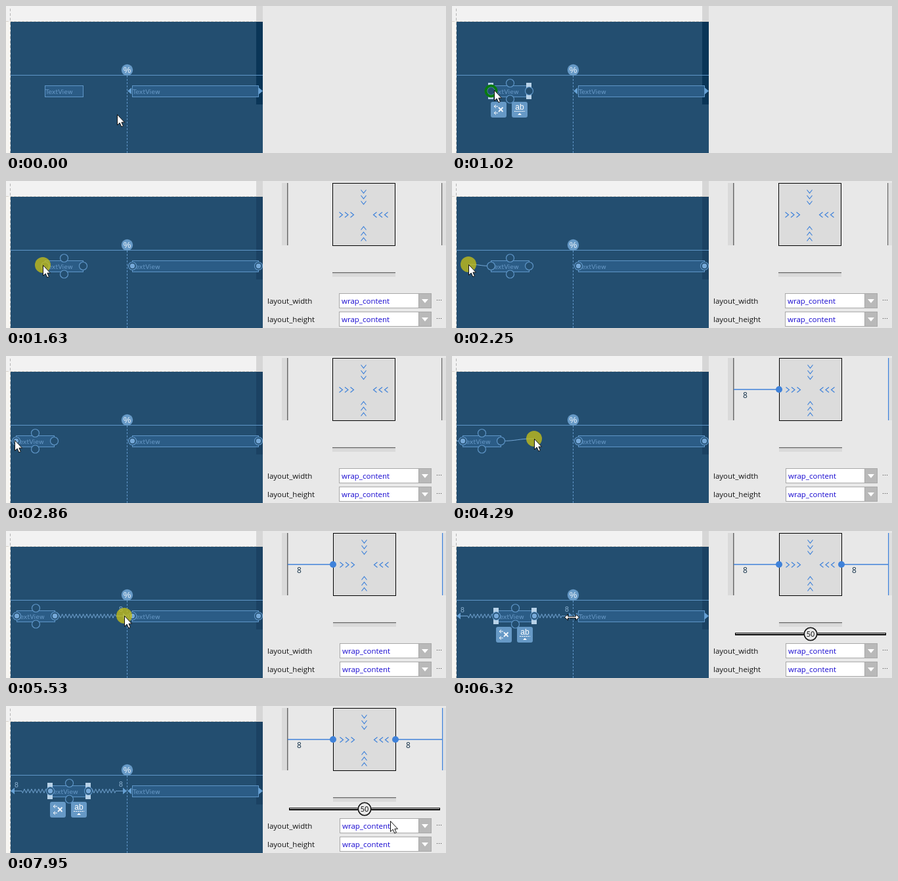
Write an HTML page with a canvas that moves like this. It is 670 px wide and 224 px high and loops after 8 s.

```html
<!DOCTYPE html>
<html lang="en">
<head>
<meta charset="utf-8">
<title>Layout editor</title>
<style>
html, body { margin: 0; width: 100%; height: 100%; overflow: hidden; background: #e8e8e8; }
canvas { display: block; }
</style>
</head>
<body>
<canvas id="stage" width="670" height="224"></canvas>
<script>
const c = document.getElementById('stage').getContext('2d');
const LOOP = 8000, TICK = 77.9;
const BLUE = '#234e70', LINE = '#5f96c8', BADGE = '#6699c6', ACCENT = '#3f82da';
const MID = 129.5, GUIDE = 184;

// Pointer path: [tick, x, y]
const POINTER = [
  [0, 169, 165], [6, 103, 134], [7, 103, 134], [9, 84, 130], [10, 84, 130], [13, 64, 128],
  [19, 64, 128], [29, 25, 127], [30, 13, 128], [36, 13, 128], [40, 36, 133], [42, 66, 133],
  [43, 66, 133], [46, 71, 128], [48, 72, 128], [53, 97, 125], [54, 97, 125], [57, 180, 129],
  [85, 180, 129], [88, 232, 163], [89, 232, 163], [91, 233, 164], [92, 233, 164],
  [97, 420, 204], [102, 585, 175]
];
// Left edge of the small view: [tick, x]
const VIEW = [[0, 59], [31, 59], [36, 15], [47, 15], [48, 16], [71, 16], [76, 67]];

function at(keys, k) {
  const i = keys.findIndex(key => key[0] > k);
  if (i < 0) return keys[keys.length - 1].slice(1);
  const a = keys[i - 1], b = keys[i], p = (k - a[0]) / (b[0] - a[0]);
  return a.slice(1).map((v, n) => Math.round(v + (b[n + 1] - v) * p));
}
const within = (k, a, b) => k >= a && k <= b;

function box(x, y, w, h, color) {
  c.fillStyle = color;
  c.fillRect(x, y, w, h);
}
function frame(x, y, w, h, fill, stroke) {
  box(x, y, w, h, fill);
  c.strokeStyle = stroke;
  c.lineWidth = 1;
  c.strokeRect(x + .5, y + .5, w - 1, h - 1);
}
function path(points, { fill, stroke, width = 1, close = false, dash = [] }) {
  c.beginPath();
  points.forEach(p => c.lineTo(p[0], p[1]));
  if (close) c.closePath();
  if (fill) { c.fillStyle = fill; c.fill(); }
  if (stroke) {
    c.setLineDash(dash);
    c.strokeStyle = stroke;
    c.lineWidth = width;
    c.stroke();
    c.setLineDash([]);
  }
}
function disc(x, y, r, fill, stroke, width = 1) {
  c.beginPath();
  c.arc(x, y, r, 0, Math.PI * 2);
  if (fill) { c.fillStyle = fill; c.fill(); }
  if (stroke) { c.strokeStyle = stroke; c.lineWidth = width; c.stroke(); }
}
function text(s, x, y, font, color, align = 'left') {
  c.font = font;
  c.fillStyle = color;
  c.textAlign = align;
  c.fillText(s, x, y);
}
const SANS = '"Liberation Sans", Arial, sans-serif';
const UI = '11.5px "Open Sans", sans-serif';

function arrow(x, dir) {
  path([[x, MID], [x - 6 * dir, MID - 5], [x - 6 * dir, MID + 5]], { fill: '#66a0d4' });
}
function handle(x, y, filled) {
  disc(x, y, 6, BLUE, LINE, 1.2);
  if (filled) disc(x, y, 3.7, '#75a8d8');
}
function textView(x, w) {
  frame(x, 121, w, 18, '#2b5c86', LINE);
  text('TextView', x + 1, 134, '9.5px "DejaVu Sans", sans-serif', '#6798c6');
}
// Zigzag link from a view edge to its anchor, straight when short
function spring(view, anchor) {
  const dir = Math.sign(anchor - view), points = [[view, MID]];
  const length = Math.abs(anchor - view) - 22;
  if (length > 6) {
    const n = Math.round(length / 2.7), step = length / n;
    points.push([view + dir * 5, MID]);
    for (let i = 0; i < n; i++) {
      points.push([view + dir * (5 + (i + .5) * step), MID + (i % 2 ? 3 : -3)]);
    }
    points.push([view + dir * (5 + length), MID]);
  }
  points.push([anchor, MID]);
  path(points, { stroke: '#73a5d3' });
}
function iconButton(x) {
  c.beginPath();
  c.roundRect(x, 146, 24, 24, 3);
  c.fillStyle = BADGE;
  c.fill();
}
function icons(x) {
  const white = { stroke: '#f4f8fc', width: 1.8 };
  iconButton(x);
  path([[x + 12, 154.5], [x + 18.5, 161]], white);
  path([[x + 18.5, 154.5], [x + 12, 161]], white);
  for (const y of [153, 163]) {
    path([[x + 5, y], [x + 11, y]], { stroke: '#f4f8fc' });
    path([[x + 8, y - 2.5], [x + 5, y], [x + 8, y + 2.5]], { stroke: '#f4f8fc' });
  }
  iconButton(x + 32);
  text('ab', x + 44, 158, '12px ' + SANS, '#fff', 'center');
  path([[x + 36, 160.5], [x + 52, 160.5]], { stroke: '#fff', dash: [2, 1] });
  path([[x + 44, 163], [x + 41, 166], [x + 47, 166]], { fill: '#fff' });
}

function backdrop(k) {
  box(0, 0, 670, 224, '#e8e8e8');
  box(0, 0, 391, 24, '#f2f2f2');
  box(0, 24, 7, 200, '#f8f6f2');
  box(7, 24, 384, 200, BLUE);
  box(381, 0, 10, 24, '#d6d6d6');
  box(381, 24, 10, 126, k < 15 ? '#0a3557' : '#1b4263');
  path([[6.5, 4], [6.5, 224]], { stroke: '#b4b4b4', dash: [4, 3] });
  path([[0, 23.5], [391, 23.5]], { stroke: '#d9d3ca', dash: [4, 2] });
  path([[7, 105.5], [391, 105.5]], { stroke: LINE });
  path([[GUIDE + .5, 106], [GUIDE + .5, 224]], { stroke: LINE, dash: [3, 2] });
  disc(184.5, 97.5, 8.7, BADGE);
  text('%', 184.5, 102, '13px ' + SANS, '#eef5fb', 'center');
}

function wideView(dragging) {
  textView(192, 193);
  if (dragging) {
    path([[185, MID], [192, MID]], { stroke: LINE });
    handle(192.5, MID, true);
    handle(384.5, MID, true);
  } else {
    arrow(185, -1);
    arrow(391, 1);
  }
}

function smallView(k, x, selected, dragging, pointer) {
  const right = x + 58, linkedLeft = k >= 31, linkedRight = k >= 71;
  const label = (lx, y) => text('8', lx, y, '10.5px ' + SANS, '#8fb4d3');
  textView(x, 59);
  if (linkedLeft) {
    spring(x, 7);
    if (x > 20) arrow(7, -1);
    if (linkedRight && x > 40) label(13, 124);
    if (!linkedRight && selected) label(8, 149);
  }
  if (linkedRight) {
    spring(right, GUIDE);
    arrow(GUIDE, 1);
    label(172, 123);
  }
  if (within(k, 19, 30) || within(k, 48, 70)) {
    const start = k < 40 ? x : right, [px, py] = pointer, mid = (start + px) / 2;
    c.beginPath();
    c.moveTo(start, MID);
    c.bezierCurveTo(mid, MID, mid, py, px, py);
    c.strokeStyle = '#75a8d8';
    c.lineWidth = 1;
    c.stroke();
  }
  if (selected) {
    for (const hx of [x, right]) for (const hy of [117, 134]) box(hx - 4, hy, 8, 8, '#b8d2e8');
    icons(x);
  }
  if (selected || dragging) {
    handle(x + 29.5, 117.5);
    handle(x + 29.5, 142);
    handle(x + .5, MID, linkedLeft);
    handle(right + .5, MID, linkedRight);
  }
  if (within(k, 13, 18) || within(k, 44, 47)) {
    const hx = k < 20 ? x : right;
    disc(hx + .5, MID, 8, null, '#087a10', 4);
    if (k >= 17 && k < 19) disc(hx + .5, MID, 4, '#2d6a70');
  }
}

function chevrons(x, y, dx, dy) {
  for (let i = -1; i <= 1; i++) {
    const px = x + i * 8.5 * Math.abs(dx), py = y + i * 8.5 * Math.abs(dy);
    path([
      [px - 2.5 * dx - 4 * dy, py - 2.5 * dy - 4 * dx],
      [px + 2.5 * dx, py + 2.5 * dy],
      [px - 2.5 * dx + 4 * dy, py - 2.5 * dy + 4 * dx]
    ], { stroke: ACCENT, width: 1.2 });
  }
}
function margin(from, to, labelX) {
  path([[from, 51], [to, 51]], { stroke: ACCENT, width: 1.4 });
  disc(from, 51, 5, ACCENT);
  text('8', labelX, 64, '12px "Open Sans", sans-serif', '#123048');
}
function field(label, value, y, s) {
  text(label, 398, y + 16, UI, '#111');
  frame(507 + s, y, 122 - s, 23, '#fff', '#a8a8a8');
  frame(628, y, 20, 23, '#b9b9b9', '#a8a8a8');
  path([[633, y + 9], [643, y + 9], [638, y + 15]], { fill: '#fff' });
  text(value, 511 + s, y + 16, UI, '#1708d0');
  for (let i = 0; i < 3; i++) box(656 + i * 3, y + 10, 1, 1, '#333');
}
// mode 1: no margins, 2: left margin, 3: both margins and bias slider
function panel(mode) {
  const s = mode > 1 ? 1 : 0;
  box(420, 3, 8, 95, '#dadada');
  box(428, 3, 1.5, 95, '#6a6a6a');
  box(663 + s, 3, 1.3, 95, s ? ACCENT : '#6a6a6a');
  box(665 + s, 3, 5, 95, '#dfdfdf');
  box(497 + s, 139, 96, 7, '#dadada');
  box(497 + s, 139, 96, 1.3, '#6a6a6a');
  frame(497 + s, 3, 96, 96, '#dcdcdc', '#000');
  chevrons(518.5 + s, 51.5, 1, 0);
  chevrons(570.5 + s, 51.5, -1, 0);
  chevrons(544.5 + s, 24.5, 0, 1);
  chevrons(544.5 + s, 80.5, 0, -1);
  if (mode > 1) margin(498, 429, 443);
  if (mode > 2) {
    margin(593, 664, 609);
    frame(431, 155, 230, 4, '#e8e8e8', '#000');
    box(431, 157, 230, 2, '#000');
    disc(546, 157, 9.7, '#e8e8e8', '#111', 1.6);
    text('50', 546, 161, '11px "Open Sans", sans-serif', '#000', 'center');
  }
  field('layout_width', 'wrap_content', 171, s);
  field('layout_height', 'wrap_content', 199, s);
}

function pointerShape(k, [x, y], pressed) {
  if (pressed) disc(x, y, 12, 'rgba(196, 190, 25, .78)');
  if (within(k, 81, 85)) {
    const w = 11, cx = k < 84 ? 182.5 : 181.5;
    const half = [[-w, 0], [-w + 5, -4.5], [-w + 5, -1.3]];
    const top = half.concat(half.slice().reverse().map(p => [-p[0], p[1]]));
    const bottom = top.map(p => [p[0], -p[1]]).reverse();
    path(top.concat(bottom).map(p => [p[0] + cx, p[1] + 131.5]),
      { fill: '#fff', stroke: '#000', close: true });
    return;
  }
  const shape = [[0, 0], [0, 16], [3.7, 12.6], [6.3, 18.5], [8.9, 17.3], [6.4, 11.7], [11, 11.7]];
  path(shape.map(p => [p[0] + x + .5, p[1] + y + .5]), { fill: '#fff', stroke: '#111', close: true });
}

function draw(time) {
  const k = Math.floor((time % LOOP + 18) / TICK);
  const pointer = at(POINTER, k), [x] = at(VIEW, k);
  const selected = within(k, 10, 18) || within(k, 37, 47) || k >= 79;
  const dragging = within(k, 19, 36) || within(k, 48, 78);
  const pressed = k === 9 || within(k, 19, 34) || within(k, 48, 78);
  const mode = [15, 37, 81].filter(start => k >= start).length;
  backdrop(k);
  wideView(dragging);
  smallView(k, x, selected, dragging, pointer);
  if (mode) panel(mode);
  pointerShape(k, pointer, pressed);
}

const begin = performance.now();
function tick() {
  draw(performance.now() - begin);
  requestAnimationFrame(tick);
}
tick();
</script>
</body>
</html>
```
